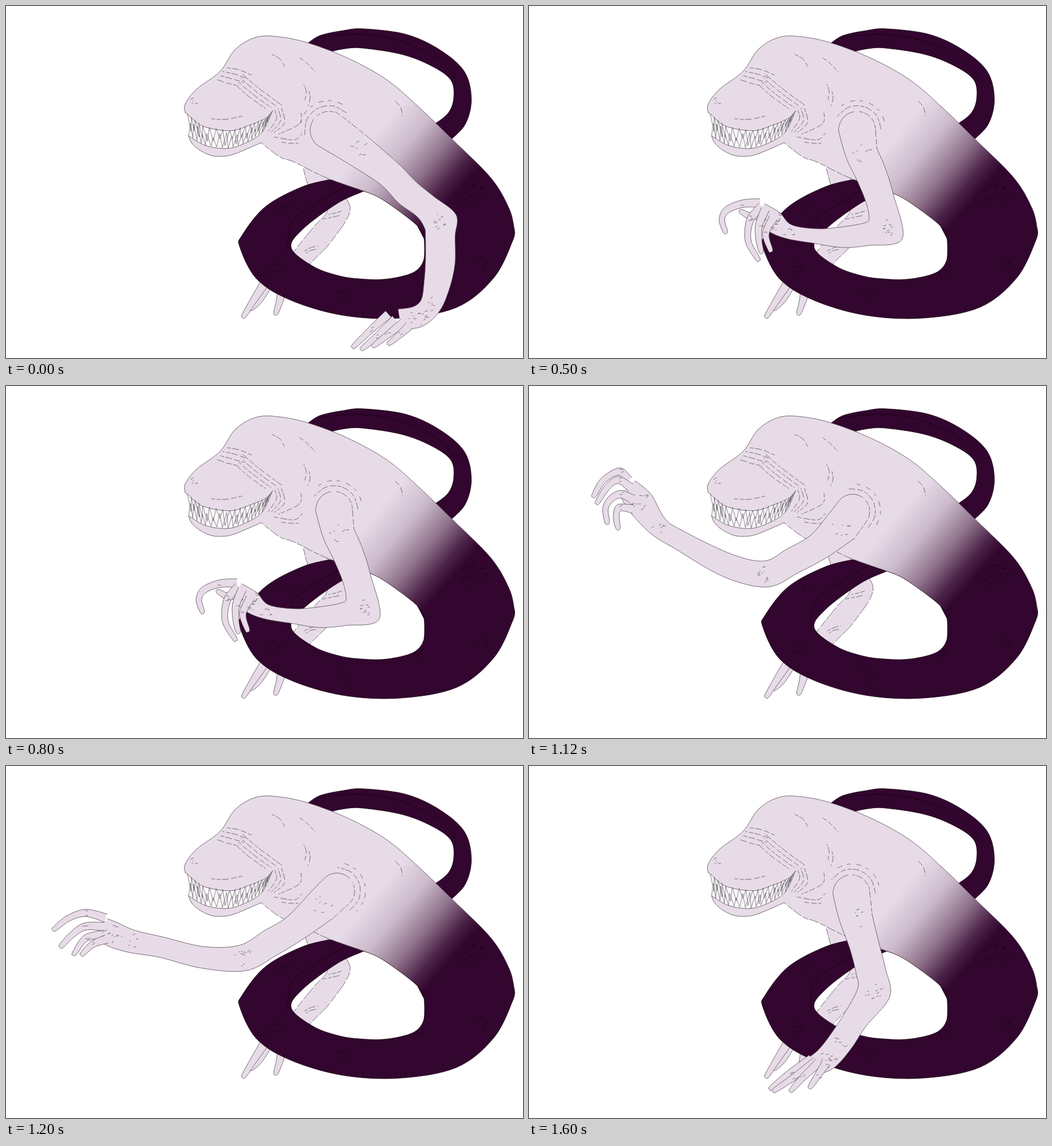
These frames come from a looping animation (906x618 px, 1.8 s). An HTML page:

```html
<!DOCTYPE html>
<html lang="en">
<head>
<meta charset="utf-8">
<title>Creature reaching</title>
<style>
html, body { margin: 0; width: 100%; height: 100%; overflow: hidden; background: #fff; }
svg { display: block; width: 906px; height: 618px; }
</style>
</head>
<body>
<svg id="stage" viewBox="0 0 906 618" fill="none" stroke-linejoin="round" stroke-linecap="round">
  <defs>
    <linearGradient id="fade" gradientUnits="userSpaceOnUse" x1="652" y1="219" x2="786" y2="332">
      <stop offset="0" stop-color="#e8dbe8"/>
      <stop offset=".32" stop-color="#cab9ca"/>
      <stop offset=".62" stop-color="#8d7089"/>
      <stop offset=".85" stop-color="#4d2449"/>
      <stop offset="1" stop-color="#32062e"/>
    </linearGradient>
  </defs>
</svg>
<script>
const SKIN = '#e8dbe8', DARK = '#32062e', INK = '#514a52', BLACK = '#16020f';
const stage = document.getElementById('stage');

let seed = 7;
const rnd = () => (seed = (seed * 9301 + 49297) % 233280) / 233280;
const points = text => text.split(' ').map(w => w.split(',').map(Number));
const mix = (a, b, u) => a.map((v, k) => v + (b[k] - v) * u);
const shift = (p, dir, r) => [p[0] + dir[0] * r, p[1] + dir[1] * r];
const unit = v => { const l = Math.hypot(...v) || 1; return [v[0] / l, v[1] / l]; };

function add(parent, tag, attrs = {}) {
  const el = document.createElementNS('http://www.w3.org/2000/svg', tag);
  for (const k in attrs) el.setAttribute(k, attrs[k]);
  parent.appendChild(el);
  return el;
}

// Smooth curve through points.
function curve(p, first = 'M') {
  let d = first + p[0];
  for (let i = 0; i < p.length - 1; i++) {
    const a = p[i - 1] || p[i], b = p[i], c = p[i + 1], e = p[i + 2] || c;
    const ctrl = (q, from, to) => [0, 1].map(k => (q[k] + (to[k] - from[k]) / 6).toFixed(1));
    d += `C${ctrl(b, a, c)} ${ctrl(c, e, b)} ${c}`;
  }
  return d;
}
// Closed shape whose sides meet at corners.
const shape = (...sides) => sides.map((s, i) => curve(s, i ? 'L' : 'M')).join('') + 'Z';

const fill = (g, d, color) => add(g, 'path', { d, fill: color, 'fill-rule': 'evenodd' });
const line = (g, p, color = INK, width = .8) =>
  add(g, 'path', { d: curve(p), stroke: color, 'stroke-width': width });
const dashed = (g, p, color = INK, dash = '9 4 6 3 11 5') =>
  add(g, 'path', { d: curve(p), stroke: color, 'stroke-width': .8, 'stroke-dasharray': dash, 'stroke-dashoffset': Math.floor(rnd() * 30) });

// Dashed folds spread evenly from curve a to curve b.
function folds(g, a, b, n) {
  const pa = points(a), pb = points(b);
  for (let i = 0; i < n; i++) dashed(g, pa.map((p, k) => mix(p, pb[k], i / (n - 1))));
}

// Short skin marks scattered around a point.
function specks(g, x, y, r, n, color = INK) {
  let d = '';
  for (let i = 0; i < n; i++) {
    const a = rnd() * 6.28, s = r * Math.sqrt(rnd()), l = 1 + rnd() * 4, tilt = rnd() - .8;
    d += `M${(x + s * Math.cos(a)).toFixed(1)},${(y + s * Math.sin(a)).toFixed(1)}l${l.toFixed(1)},${(l * tilt).toFixed(1)}`;
  }
  add(g, 'path', { d, stroke: color, 'stroke-width': .8 });
}

// Both edges of a limb given as [x, y, half width] along its middle.
function ribbon(p) {
  const dirs = p.map((q, i) => {
    const a = p[i - 1], c = p[i + 1];
    const before = a ? unit([q[0] - a[0], q[1] - a[1]]) : [0, 0];
    const after = c ? unit([c[0] - q[0], c[1] - q[1]]) : [0, 0];
    return unit([before[0] + after[0], before[1] + after[1]]);
  });
  const side = s => p.map((q, i) => shift(q, [-dirs[i][1] * s, dirs[i][0] * s], q[2]));
  return { dirs, right: side(1), left: side(-1) };
}

function finger(g, text) {
  const spine = points(text), n = spine.length - 1;
  const p = spine.map((q, i) => [...q, 7.5 - 3.5 * i / n]);
  const { dirs, right, left } = ribbon(p);
  const edge = [...right, shift(p[n], dirs[n], 4), ...left.reverse()];
  fill(g, curve(edge) + 'Z', SKIN);
  line(g, edge);
}

function mouth(g) {
  const lip = points('318,190 345,211 393,219 430,208 457,196 467,184');
  const gum = points('320,228 350,245 390,250 425,238 450,220 467,184');
  const at = (p, u) => {
    const s = Math.max(0, Math.min(.999, u)) * (p.length - 1), i = Math.floor(s);
    return mix(p[i], p[i + 1], s - i);
  };
  fill(g, shape(lip, [...gum].reverse()), '#faf8fa');
  const n = 19;
  for (const [from, to] of [[lip, gum], [gum, lip]]) {
    let d = 'M' + from[0];
    for (let i = 0; i < n; i++) {
      const u = (i + .4 + rnd() * .3) / n * .94;
      d += 'L' + mix(at(from, u), at(to, u), .45 + .45 * rnd()) + 'L' + at(from, (i + 1) / n * .94);
    }
    add(g, 'path', { d, stroke: INK, 'stroke-width': .65 });
  }
  line(g, [[314, 187], ...lip]);
  line(g, gum);
}

function drawBody(g) {
  // Tail loop behind the back
  const loop = ribbon(points('540,82,20 558,67,17 593,59,16 626,57,17 696,67,18 751,90,16 791,122,14 800,163,15.5 789,199,18 760,225,20'));
  fill(g, shape(loop.right, loop.left.reverse()), DARK);
  line(g, loop.left, BLACK);
  line(g, loop.right, BLACK);
  line(g, points('545,56 585,51 628,50 680,58 725,75 760,95 789,128'), BLACK);

  // Far arm
  const arm = ribbon(points('534,280,14 548,312,18 583,355,20 555,400,20 522,438,18 480,490,14'));
  fill(g, shape(arm.right, [...arm.left].reverse()), SKIN);
  dashed(g, arm.right, INK, '26 3 14 4');
  dashed(g, arm.left, INK, '26 3 14 4');
  folds(g, '555,374 570,371 584,368', '566,366 579,363 588,360', 2);
  folds(g, '523,430 535,424 547,421', '526,434 534,429 546,427', 2);
  finger(g, '460,488 444,516 430,531');
  finger(g, '451,490 433,518 417,544');
  finger(g, '483,504 479,520 473,539');

  // Coil
  const outer = points('577,303 520,317 455,352 414,402 410,424 440,480 500,517 590,543 690,548 790,529 855,477 888,412 891,392');
  const hole = points('627,325 580,347 520,392 500,425 540,458 585,474 620,479 660,480 700,473 722,462 733,442 733,410');
  fill(g, shape(outer, points('868,328 720,300 620,300')) + shape(hole, points('720,385 690,330')), DARK);
  line(g, outer, BLACK);
  line(g, hole, BLACK);
  line(g, points('592,317 560,337 528,356 505,375 496,395 494,426'), BLACK);

  // Torso and head
  const back = points('314,187 314,172 334,146 375,115 402,76 438,55 478,54 530,65 600,92 668,130 725,179 782,234 850,302 882,356 891,392');
  const belly = points('733,442 733,410 720,385 660,340 627,325 560,301 505,274 480,265 447,240');
  const jaw = points('447,240 400,260 377,264 358,262 338,252 325,240 320,228');
  fill(g, shape(back, belly, jaw, [[318, 192]]), 'url(#fade)');
  line(g, back);
  line(g, jaw);
  dashed(g, belly.slice(4), INK, '17 3 9 4');
  line(g, belly.slice(0, 5), BLACK);
  mouth(g);

  // Skin folds
  folds(g, '385,108 408,112 432,122', '369,129 390,136 408,140', 4);
  folds(g, '415,120 440,142 483,174', '405,141 427,160 455,180', 4);
  folds(g, '470,180 474,198 460,220', '483,180 488,205 470,222', 3);
  folds(g, '517,188 514,207 478,225', '519,224 505,235 470,230', 2);
  folds(g, '466,85 480,93 488,106', '515,91 528,101 541,115', 2);
  folds(g, '522,138 526,150 524,165', '531,150 533,162 529,175', 2);
  dashed(g, points('360,198 385,199 415,193'));
  dashed(g, points('682,167 691,177 695,192'));
  dashed(g, points('483,239 497,241 512,241'));
  specks(g, 326, 170, 8, 4);

  for (const [x, y, r, n] of [[816, 330, 24, 26], [834, 448, 12, 7], [589, 510, 12, 6], [470, 460, 12, 6], [718, 465, 12, 6], [480, 352, 12, 5]])
    specks(g, x, y, r, n, BLACK);
}

// Each arm runs from shoulder to knuckles as x,y,half width.
const poses = [
  { at: 0, elbow: 5,
    arm: '566,218,33 618,254,29 672,295,24 704,328,24 735,352,23 761,378,30 761,405,26 761,450,26 755,490,23 744,525,19 722,545,19 690,550,18',
    fingers: ['670,541 640,568 610,597', '682,550 650,580 625,601', '696,556 668,578 645,596', '706,562 690,577 672,592'] },
  { at: 500, elbow: 4,
    arm: '575,217,32 583,259,28 599,294,27 614,336,25 625,391,34 590,401,20 548,406,18 503,404,13 455,396,13 428,378,19 404,358,14',
    fingers: ['404,366 388,369 372,361', '405,346 375,347 347,358 338,375 344,396', '408,352 388,375 384,412 401,444', '414,357 403,385 403,412 407,431', '428,372 415,400 423,428'] },
  { at: 1000, elbow: 4,
    arm: '567,220,30 547,247,31 507,282,24 462,307,23 415,330,23 348,315,21 263,270,17 226,246,18 195,205,24 172,178,18',
    fingers: ['175,166 158,150 130,166 114,192', '178,178 156,165 137,178 120,204', '180,198 160,190 143,199 134,215 137,239', '182,216 158,214 153,230 156,249'] },
  { at: 1200, elbow: 4,
    arm: '580,219,31 553,245,30 507,284,24 463,311,24 415,337,23 345,336,19 272,318,18 221,308,20 186,295,22 168,283,18',
    fingers: ['175,267 140,258 110,267 85,286', '172,282 138,282 115,297 97,316', '172,296 140,302 120,329', '176,304 152,313 134,330'] },
  { at: 1400, elbow: 4,
    arm: '566,232,30 545,268,28 505,312,23 460,363,25 424,390,23 350,428,21 297,458,17 268,476,17 238,491,17 214,494,10',
    fingers: ['208,490 188,496 160,533', '212,494 195,508 173,537', '226,492 214,510 205,538', '242,494 237,512 227,537'] },
  { at: 1600, elbow: 4,
    arm: '565,223,32 573,267,29 587,313,26 599,360,26 604,398,29 572,445,22 547,483,22 522,513,21 497,528,17',
    fingers: ['495,514 460,537 425,565', '503,518 465,546 431,569', '508,520 480,547 460,569', '520,522 505,545 493,563'] }
];

function drawArm(pose) {
  const g = add(stage, 'g'), p = points(pose.arm), n = p.length;
  const { dirs, right, left } = ribbon(p);
  // Ring around the shoulder: 0 is the right edge, 180 the left edge.
  const base = Math.atan2(dirs[0][1], dirs[0][0]) + Math.PI / 2;
  const ring = (from, to, grow) => [0, .25, .5, .75, 1].map(u => {
    const a = base + (from + (to - from) * u) * Math.PI / 180;
    return shift(p[0], [Math.cos(a), Math.sin(a)], p[0][2] + grow);
  });
  fill(g, curve([...right].reverse().concat(ring(30, 150, 0), left)) + 'Z', SKIN);
  line(g, [...right].reverse().concat(ring(20, 90, 0)));
  line(g, left.slice(1));
  dashed(g, [...ring(105, 180, 0), left[1]]);
  dashed(g, ring(45, 190, 10));
  dashed(g, ring(60, 180, 19), INK, '8 9 5 12');

  pose.fingers.forEach(f => finger(g, f));
  const [ex, ey] = p[pose.elbow];
  specks(g, ex, ey, 15, 11);
  specks(g, ...p[n - 2].slice(0, 2), 18, 14);
  specks(g, ...p[n - 3].slice(0, 2), 12, 6);
  specks(g, ...p[1].slice(0, 2), 18, 7);
  for (const f of pose.fingers) specks(g, ...points(f)[1], 5, 2);
  return g;
}

drawBody(add(stage, 'g'));
const arms = poses.map(drawArm);

function show(ms) {
  const now = poses.filter(p => p.at <= ms % 1800).length - 1;
  arms.forEach((g, i) => g.setAttribute('display', i === now ? 'inline' : 'none'));
}

const start = performance.now();
function tick() {
  show(performance.now() - start);
  requestAnimationFrame(tick);
}
tick();
</script>
</body>
</html>
```
